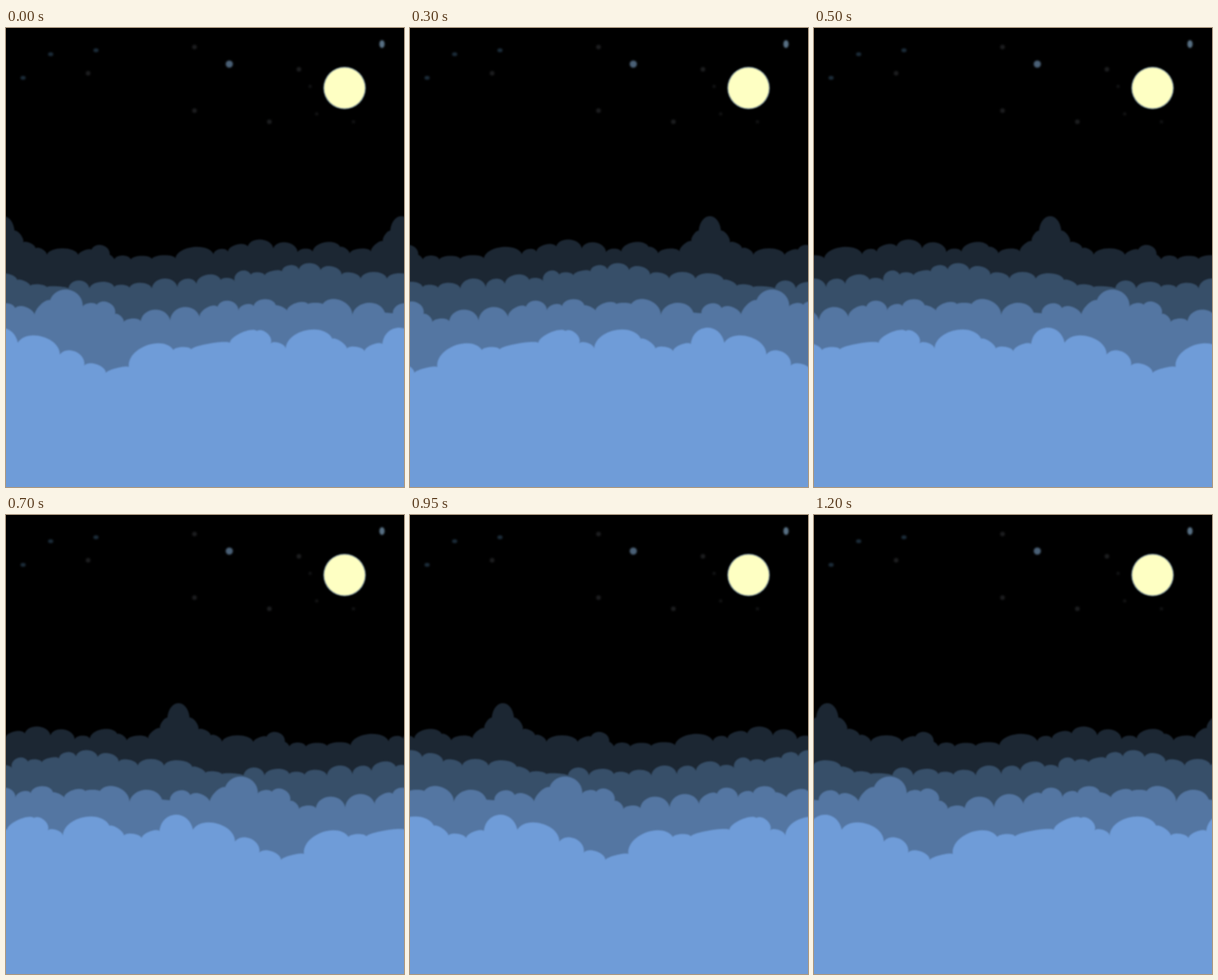
These frames come from a looping animation (606x700 px, 1.25 s). An HTML page with a canvas:

```html
<!DOCTYPE html>
<html lang="en">
<head>
<meta charset="utf-8">
<title>Night clouds</title>
<style>
  html, body { margin: 0; width: 100%; height: 100%; overflow: hidden; background: #000; }
  canvas { display: block; }
</style>
</head>
<body>
<canvas id="stage" width="606" height="700"></canvas>
<script>
const W = 606, H = 700, LOOP = 1250, STEP = 50;
const ctx = document.getElementById('stage').getContext('2d');

// Each lobe: x and y of its left notch, then how far it bulges above the chord to the next notch.
const farClouds = [
  [-50, 341, 4], [-32, 325, 3], [-21, 309, 22], [13, 309, 4], [26, 327, 4], [45, 336, 4],
  [62, 346, 10], [110, 346, 3], [130, 338, 11], [158, 346, 1], [165, 353, 6], [190, 353, 5],
  [222, 352, 5], [258, 351, 14], [316, 345, 6], [338, 341, 7], [368, 333, 12], [407, 336, 12],
  [444, 342, 5], [467, 341, 11], [509, 334, 3], [523, 344, 6]
];
const highClouds = [
  [-26, 382, 9], [17, 384, 3], [37, 393, 3], [62, 395, 2], [95, 397, 12], [127, 397, 9],
  [165, 395, 4], [188, 396, 8], [222, 397, 14], [261, 395, 10], [290, 390, 11], [327, 384, 4],
  [348, 386, 11], [373, 376, 4], [394, 377, 4], [420, 371, 8], [446, 368, 10], [479, 369, 9],
  [511, 376, 6], [540, 382, 10]
];
const midClouds = [
  [-17, 435, 11], [14, 427, 8], [44, 440, 6], [67, 415, 21], [117, 425, 4], [138, 422, 11],
  [166, 436, 4], [179, 449, 5], [205, 447, 17], [250, 446, 18], [295, 441, 7], [322, 425, 12],
  [354, 431, 6], [377, 424, 10], [411, 423, 2], [428, 431, 7], [460, 421, 2], [482, 421, 16],
  [527, 440, 18], [577, 434, 0]
];
const nearClouds = [
  [-33, 482, 24], [18, 480, 19], [82, 498, 14], [119, 515, 8], [152, 526, 3], [187, 517, 21],
  [255, 491, 4], [282, 490, 4], [341, 480, 7], [382, 462, 8], [403, 481, 5], [426, 489, 21],
  [497, 474, 4], [519, 489, 5], [546, 493, 5]
];
const layers = [
  ['#1c2733', farClouds], ['#374f69', highClouds], ['#5476a2', midClouds], ['#6f9cd8', nearClouds]
].map(([color, lobes]) => ({ color, path: cloudPath(lobes) }));

function cloudPath(lobes) {
  const path = new Path2D();
  path.moveTo(lobes[0][0] - W, H + 20);
  for (let tile = -1; tile < 3; tile++) {
    lobes.forEach(([lx, y, bulge], i) => {
      const last = i === lobes.length - 1;
      const [nx, ny] = lobes[last ? 0 : i + 1];
      const x = lx + tile * W, endX = nx + (last ? tile + 1 : tile) * W;
      const dx = endX - x, dy = ny - y, rise = bulge * 4 / 3 / Math.hypot(dx, dy);
      const ox = dy * rise, oy = -dx * rise;
      path.lineTo(x, y);
      path.bezierCurveTo(x + dx * 0.1 + ox, y + dy * 0.1 + oy,
        endX - dx * 0.1 + ox, ny - dy * 0.1 + oy, endX, ny);
    });
  }
  path.lineTo(lobes[0][0] + 3 * W, H + 20);
  path.closePath();
  return path;
}

function dot(x, y, rx, ry, color) {
  ctx.fillStyle = color;
  ctx.beginPath();
  ctx.ellipse(x, y, rx, ry, 0, 0, Math.PI * 2);
  ctx.fill();
}

function drawSky() {
  ctx.fillStyle = '#000';
  ctx.fillRect(0, 0, W, H);
  ctx.filter = 'blur(1.5px)';
  dot(340, 55, 5.5, 5.5, '#4a6076');
  dot(572.5, 24.5, 4, 6, '#587084');
  for (const [x, y] of [[68, 40], [26, 76], [137, 34]]) dot(x, y, 4, 3, '#1b2b38');
  for (const [x, y] of [[287, 29], [287, 126], [125, 69], [401, 143], [446, 63]]) dot(x, y, 3.5, 3.5, '#1c1d1f');
  for (const [x, y] of [[463, 89], [473, 131], [529, 143]]) dot(x, y, 2.5, 2.5, '#121314');
  ctx.filter = 'blur(1px)';
  dot(515.5, 91.5, 32.5, 32.5, '#60727a');
  dot(515.5, 91.5, 31, 31, '#feffc3');
}

function draw(step) {
  drawSky();
  const shift = step * STEP / LOOP * W;
  for (const { color, path } of layers) {
    ctx.save();
    ctx.translate(-shift, 0);
    ctx.fillStyle = color;
    ctx.fill(path);
    ctx.restore();
  }
  ctx.filter = 'none';
}

let start = null, shown = -1;
function tick(now) {
  if (start === null) start = now;
  const step = Math.floor((now - start) % LOOP / STEP);
  if (step !== shown) draw(shown = step);
  requestAnimationFrame(tick);
}
draw(0);
requestAnimationFrame(tick);
</script>
</body>
</html>
```
